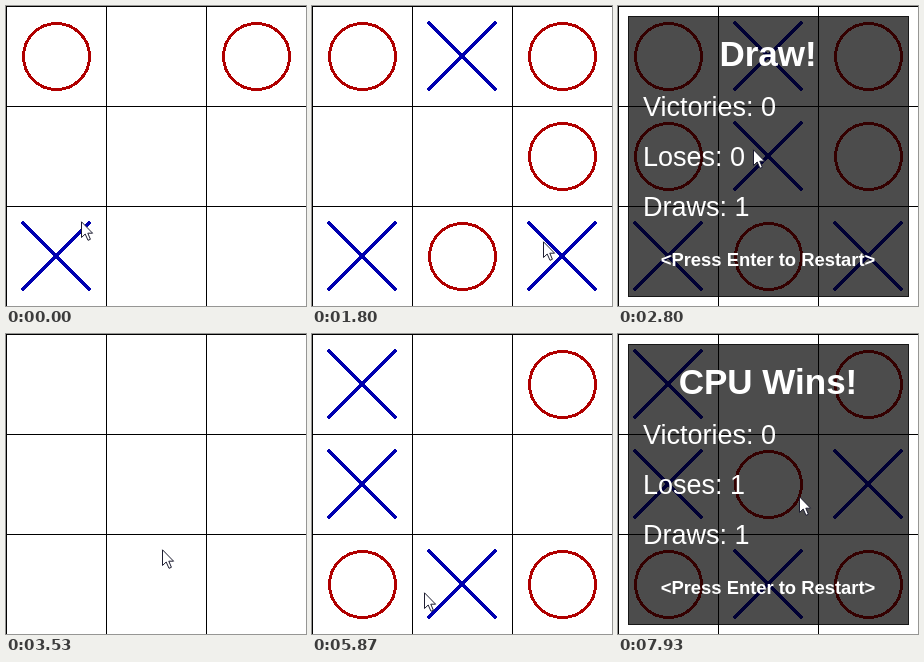
Animation of 300 by 300 pixels, one loop 8 s. Source, as an HTML page:

```html
<!DOCTYPE html>
<html lang="en">
<head>
<meta charset="utf-8">
<title>Noughts and crosses</title>
<style>
  html, body { margin: 0; width: 100%; height: 100%; overflow: hidden; background: #fff; }
  svg { display: block; width: 100vw; height: 100vh; }
  text { fill: #fff; font-family: "Liberation Sans", Arial, sans-serif; }

  .grid, .mark { fill: none; shape-rendering: crispEdges; }
  .grid { stroke: #000; }
  .x { stroke: #0000b0; stroke-width: 3.7; stroke-linecap: round; }
  .o { stroke: #b00000; stroke-width: 3; }
  .shade { fill: #000; fill-opacity: .7; shape-rendering: crispEdges; }
  .frame { fill: none; stroke: #000; stroke-opacity: .7; shape-rendering: crispEdges; }
  .title { font-size: 35px; font-weight: bold; text-anchor: middle; }
  .stat { font-size: 27px; }
  .hint { font-size: 18.4px; font-weight: bold; text-anchor: middle; }

  /* 8 s loop of 120 ticks; the small offset absorbs rounding at tick edges */
  .anim { animation: 8s step-end -5ms infinite; }
  .game1 { animation-name: clear; }
  .a2 { animation-name: a2; }
  .a3 { animation-name: a3; }
  .a4 { animation-name: a4; }
  .b1 { animation-name: b1; }
  .b2 { animation-name: b2; }
  .b3 { animation-name: b3; }
  .b4 { animation-name: b4; }
  .cursor { animation-name: move; }

  @keyframes clear { from { opacity: 1 } 40%, to { opacity: 0 } }
  @keyframes a2 { from { opacity: 0 } 7.5%, to { opacity: 1 } }
  @keyframes a3 { from { opacity: 0 } 22.5%, to { opacity: 1 } }
  @keyframes a4 { from { opacity: 0 } 35%, to { opacity: 1 } }
  @keyframes b1 { from { opacity: 0 } 50.8333%, to { opacity: 1 } }
  @keyframes b2 { from { opacity: 0 } 65.8333%, to { opacity: 1 } }
  @keyframes b3 { from { opacity: 0 } 73.3333%, to { opacity: 1 } }
  @keyframes b4 { from { opacity: 0 } 85.8333%, to { opacity: 1 } }

  @keyframes move {
    0% { transform: translate(75px, 215px) }
    .8333% { transform: translate(75px, 215px); animation-timing-function: steps(7, start) }
    6.6667% { transform: translate(124px, 75px) }
    11.6667% { transform: translate(126px, 73px) }
    15.8333% { transform: translate(126px, 73px); animation-timing-function: steps(7, start) }
    21.6667% { transform: translate(231px, 235px) }
    25.8333% { transform: translate(231px, 235px); animation-timing-function: steps(6, start) }
    30.8333% { transform: translate(135px, 143px) }
    41.6667% { transform: translate(135px, 143px); animation-timing-function: steps(4, start) }
    45% { transform: translate(156px, 215px) }
    45.8333% { transform: translate(156px, 215px); animation-timing-function: steps(5, start) }
    50% { transform: translate(55px, 47px) }
    52.5% { transform: translate(56px, 47px) }
    54.1667% { transform: translate(57px, 46px) }
    55.8333% { transform: translate(57px, 46px); animation-timing-function: steps(5, start) }
    60% { transform: translate(145px, 150px); animation-timing-function: steps(3, start) }
    62.5% { transform: translate(161px, 176px); animation-timing-function: steps(1, start) }
    63.3333% { transform: translate(151px, 174px); animation-timing-function: steps(2, start) }
    65% { transform: translate(30px, 156px) }
    70% { transform: translate(30px, 156px); animation-timing-function: steps(3, start) }
    72.5% { transform: translate(112px, 258px) }
    74.1667% { transform: translate(112px, 258px); animation-timing-function: steps(2, start) }
    75.8333% { transform: translate(119px, 252px) }
    80% { transform: translate(119px, 252px); animation-timing-function: steps(6, start) }
    85% { transform: translate(218px, 160px) }
    98.3333% { transform: translate(218px, 160px); animation-timing-function: steps(1, start) }
    99.1667% { transform: translate(197px, 159px); animation-timing-function: steps(1, start) }
    100% { transform: translate(181px, 162px) }
  }
</style>
</head>
<body>
<svg viewBox="0 0 300 300">
  <defs>
    <path id="x" class="mark x" d="M17 17L83 83M83 17L17 83"/>
    <circle id="o" class="mark o" cx="50.5" cy="50.5" r="33"/>
    <g id="panel">
      <path class="shade" d="M10 10H291V291H10Z"/>
      <path class="frame" d="M10.5 10.5H290.5V290.5H10.5Z"/>
      <text class="stat" x="25" y="110">Victories: 0</text>
      <text class="stat" x="25" y="210">Draws: 1</text>
      <text class="hint" x="150" y="260">&lt;Press Enter to Restart&gt;</text>
    </g>
  </defs>

  <path class="grid" d="M0 .5H300M0 100.5H300M0 200.5H300M.5 0V300M100.5 0V300M200.5 0V300"/>

  <g class="anim game1">
    <use href="#o"/>
    <use href="#o" x="200"/>
    <use href="#x" y="200"/>
    <g class="anim a2">
      <use href="#x" x="100"/>
      <use href="#o" x="200" y="100"/>
    </g>
    <g class="anim a3">
      <use href="#x" x="200" y="200"/>
      <use href="#o" x="100" y="200"/>
    </g>
    <g class="anim a4">
      <use href="#x" x="100" y="100"/>
      <use href="#o" y="100"/>
      <use href="#panel"/>
      <text class="title" x="150" y="60">Draw!</text>
      <text class="stat" x="25" y="160">Loses: 0</text>
    </g>
  </g>

  <g class="anim b1">
    <use href="#x"/>
    <use href="#o" y="200"/>
  </g>
  <g class="anim b2">
    <use href="#x" y="100"/>
    <use href="#o" x="200" y="200"/>
  </g>
  <g class="anim b3">
    <use href="#x" x="100" y="200"/>
    <use href="#o" x="200"/>
  </g>
  <g class="anim b4">
    <use href="#x" x="200" y="100"/>
    <use href="#o" x="100" y="100"/>
    <use href="#panel"/>
    <text class="title" x="150" y="60">CPU Wins!</text>
    <text class="stat" x="25" y="160">Loses: 1</text>
  </g>

  <g class="anim cursor">
    <path d="M.5 .8V16.5L4.2 13L7 19.3L9.4 18.3L6.8 12.2H11.6Z" fill="#fff" stroke="#1c1c30"/>
  </g>
</svg>
</body>
</html>
```
